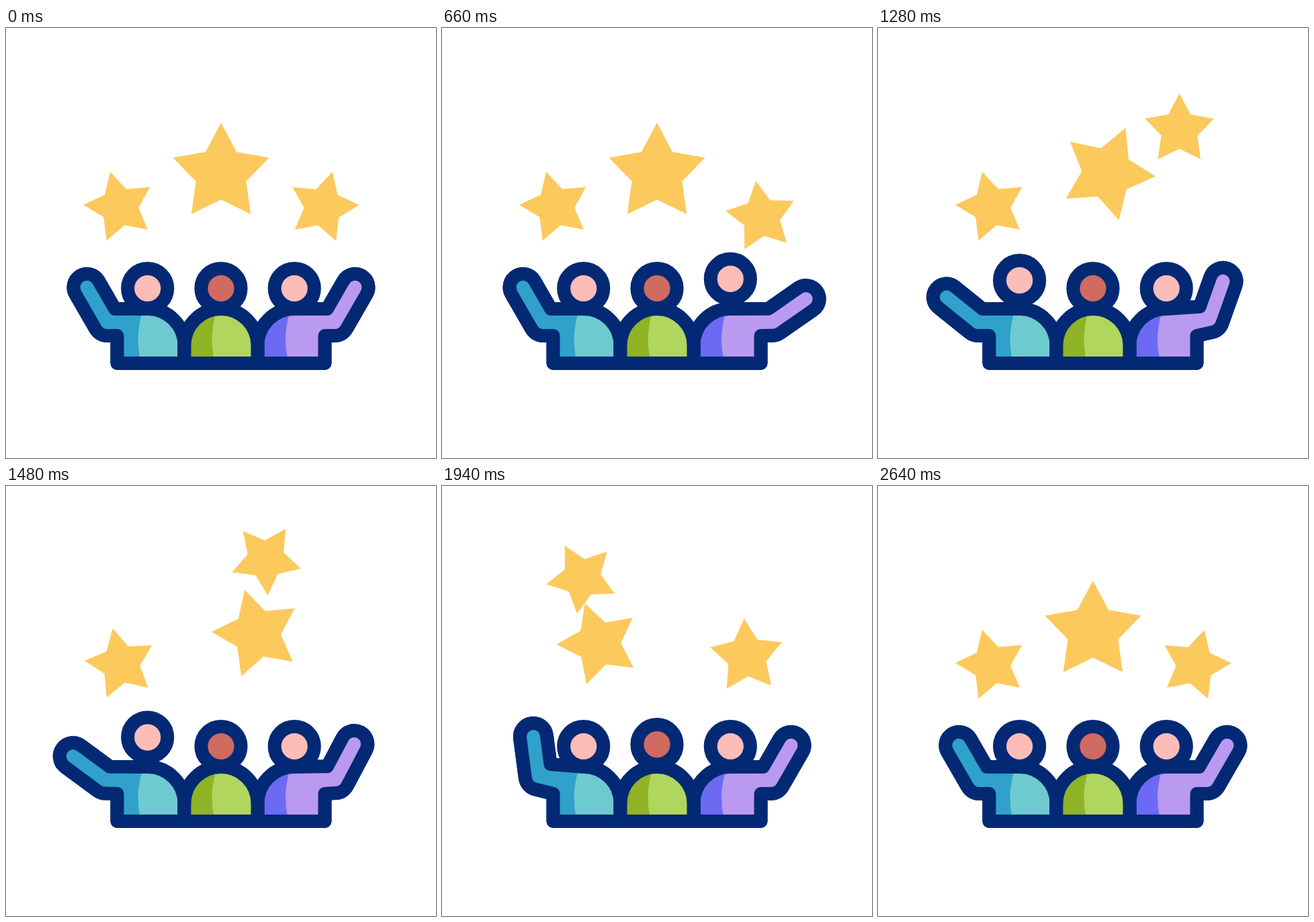
Recreate the animation shown at these times as an HTML page with a canvas. Size 640 by 640 pixels, loop 3 s.

```html
<!DOCTYPE html>
<html lang="en">
<head>
<meta charset="utf-8">
<title>Team juggling stars</title>
<style>
  html, body { margin: 0; width: 100%; height: 100%; overflow: hidden; background: #fff; }
  canvas { display: block; width: 640px; height: 640px; }
</style>
</head>
<body>
<canvas id="stage" width="640" height="640"></canvas>
<script>
const ctx = document.getElementById('stage').getContext('2d');
const LOOP = 3000;
const NAVY = '#032975', GOLD = '#fcc95d', PINK = '#fcbdb9', BROWN = '#cf6b60';

const mix = (a, b, p) => a + (b - a) * p;
const ease = (t, from, to) => {
  const u = Math.min(1, Math.max(0, (t - from) / (to - from)));
  return u * u * (3 - 2 * u);
};

// Eased interpolation through keys of the form [time, ...values].
function keyed(keys, t) {
  let i = 0;
  while (i < keys.length - 2 && t > keys[i + 1][0]) i++;
  const [a, ...from] = keys[i], [b, ...to] = keys[i + 1];
  const p = ease(t, a, b);
  return from.map((v, k) => mix(v, to[k], p));
}

// Smooth curve through points [s, ...values].
function curve(points, s) {
  const last = points.length - 1;
  let i = 0;
  while (i < last - 1 && s > points[i + 1][0]) i++;
  const [a, b] = [points[i], points[i + 1]];
  const h = b[0] - a[0], u = (s - a[0]) / h;
  const slope = (j, k) => (points[j + 1][k] - points[j][k]) / (points[j + 1][0] - points[j][0]);
  const tangent = (j, k) => {
    if (j === 0) return slope(0, k);
    if (j === last) return slope(last - 1, k);
    const before = points[j][0] - points[j - 1][0], after = points[j + 1][0] - points[j][0];
    return (after * slope(j - 1, k) + before * slope(j, k)) / (before + after);
  };
  return [1, 2, 3].map(k =>
    a[k] * (1 + 2 * u) * (1 - u) ** 2 + b[k] * u * u * (3 - 2 * u) +
    h * u * (1 - u) * (tangent(i, k) * (1 - u) - tangent(i + 1, k) * u));
}

function star(x, y, radius, degrees) {
  ctx.beginPath();
  for (let i = 0; i < 10; i++) {
    const a = degrees * Math.PI / 180 + i * Math.PI / 5;
    const r = i % 2 ? radius * 0.523 : radius;
    ctx.lineTo(x + r * Math.sin(a), y - r * Math.cos(a));
  }
  ctx.fillStyle = GOLD;
  ctx.fill();
}

const throwTime = t => ease(t, 600, 2600);
const throwPath = [
  [600, 475.5, 282.6, -9.3], [1280, 448.7, 151.8, 72], [1680, 305.6, 95, 138.1],
  [1940, 208.6, 136.4, 187.6], [2280, 165.8, 228.6, 235.8], [2600, 169, 266.1, 273]
].map(([t, ...pose]) => [throwTime(t), ...pose]);

function drawStars(t) {
  // Right to left, over the top
  const [x, y, turn] = t < 600
    ? keyed([[200, 471.8, 266.3, 15], [600, ...throwPath[0].slice(1)]], t)
    : curve(throwPath, throwTime(t));
  star(x, y, 54, turn);

  // Centre to right
  const p = ease(t, 1000, 2200);
  star(mix(320, 471.8, p), mix(216.2, 266.3, p * (1.25 * p - 0.25)), mix(75.2, 54, p), 159 * p);

  // Left to centre
  const q = 1 - ease(t, 1400, 2600);
  star(mix(320, 169, q), mix(216.2, 266.1, q * (0.85 * q + 0.15)), mix(75.2, 54, q), 144 - 159 * q);
}

// Crossing of the line p + d with the line through q and r.
function meet(p, d, q, r) {
  const e = [r[0] - q[0], r[1] - q[1]];
  const k = ((q[0] - p[0]) * e[1] - (q[1] - p[1]) * e[0]) / (d[0] * e[1] - d[1] * e[0]);
  return [p[0] + d[0] * k, p[1] + d[1] * k];
}

function traceArmedBody([hx, hy, ex, ey]) {
  const W = 20, armpit = [474.5, 458];
  const angle = Math.atan2(hy - ey, hx - ex);
  const d = [Math.cos(angle), Math.sin(angle)];
  const nx = d[1] * W, ny = -d[0] * W;
  const inner = meet([hx + nx, hy + ny], d, [429, 418], [ex, ey - W]);
  const outer = meet([hx - nx, hy - ny], d, armpit, [ex, ey + W]);
  ctx.moveTo(374.5, 499);
  ctx.arc(429, 472.5, 54.5, Math.PI, 1.5 * Math.PI);
  ctx.lineTo(...inner);
  ctx.arc(hx, hy, W, angle - Math.PI / 2, angle + Math.PI / 2);
  ctx.arcTo(...outer, ...armpit, W);
  ctx.lineTo(...armpit);
  ctx.lineTo(474.5, 499);
  ctx.closePath();
}

function traceDome() {
  ctx.moveTo(265.5, 499);
  ctx.arc(320, 472.5, 54.5, Math.PI, 0);
  ctx.lineTo(374.5, 499);
  ctx.closePath();
}

function body(trace, mirrored, shadeX, light, shade) {
  ctx.save();
  ctx.beginPath();
  if (mirrored) ctx.setTransform(-1, 0, 0, 1, 640, 0);
  trace();
  ctx.setTransform(1, 0, 0, 1, 0, 0);
  ctx.strokeStyle = NAVY;
  ctx.lineWidth = 20;
  ctx.lineJoin = 'round';
  ctx.stroke();
  ctx.save();
  ctx.clip();
  ctx.fillStyle = light;
  ctx.fillRect(0, 300, 640, 189);
  ctx.beginPath();
  ctx.moveTo(0, 300);
  ctx.lineTo(shadeX + 3, 300);
  ctx.lineTo(shadeX + 3, 426);
  ctx.quadraticCurveTo(shadeX - 6, 458, shadeX, 489);
  ctx.lineTo(0, 489);
  ctx.fillStyle = shade;
  ctx.fill();
  ctx.restore();
  ctx.restore();
}

// Repaints the inner half of the outline that the clipped fill covered.
function outline(trace, mirrored) {
  ctx.save();
  ctx.beginPath();
  if (mirrored) ctx.setTransform(-1, 0, 0, 1, 640, 0);
  trace();
  ctx.strokeStyle = NAVY;
  ctx.lineWidth = 20;
  ctx.lineJoin = 'round';
  ctx.stroke();
  ctx.restore();
}

function person(trace, mirrored, shadeX, light, shade) {
  body(trace, mirrored, shadeX, light, shade);
  outline(trace, mirrored);
}

function head(x, lift, start, skin, t) {
  const y = 387.5 - lift * (ease(t, start, start + 400) - ease(t, start + 400, start + 800));
  ctx.beginPath();
  ctx.arc(x, y, 29.6, 0, 2 * Math.PI);
  ctx.fillStyle = skin;
  ctx.fill();
  ctx.strokeStyle = NAVY;
  ctx.lineWidth = 20;
  ctx.stroke();
}

// Arm poses: hand x, y and elbow x, y, as seen on the right side.
const REST = [519.5, 386, 489.5, 438], LOW = [543, 404.5, 492, 438];
const rightArm = [[200, ...REST], [600, ...LOW], [1100, 511, 373, 495, 432], [1600, ...REST]];
const leftArm = [[1000, ...REST], [1400, ...LOW], [1900, 503.5, 372.5, 496.5, 432.5], [2250, ...REST]];

function draw(t) {
  ctx.fillStyle = '#fff';
  ctx.fillRect(0, 0, 640, 640);
  drawStars(t);
  person(() => traceArmedBody(keyed(leftArm, t)), true, 199, '#6dcbd0', '#2fa1cb');
  person(() => traceArmedBody(keyed(rightArm, t)), false, 418.5, '#ba9af0', '#6c6af3');
  person(traceDome, false, 309, '#b1d65d', '#8fb324');
  head(210.7, 15, 1000, PINK, t);
  head(429.3, 15, 200, PINK, t);
  head(320, 10, 1800, BROWN, t);
}

function tick() {
  draw(performance.now() % LOOP);
  requestAnimationFrame(tick);
}
tick();
</script>
</body>
</html>
```
